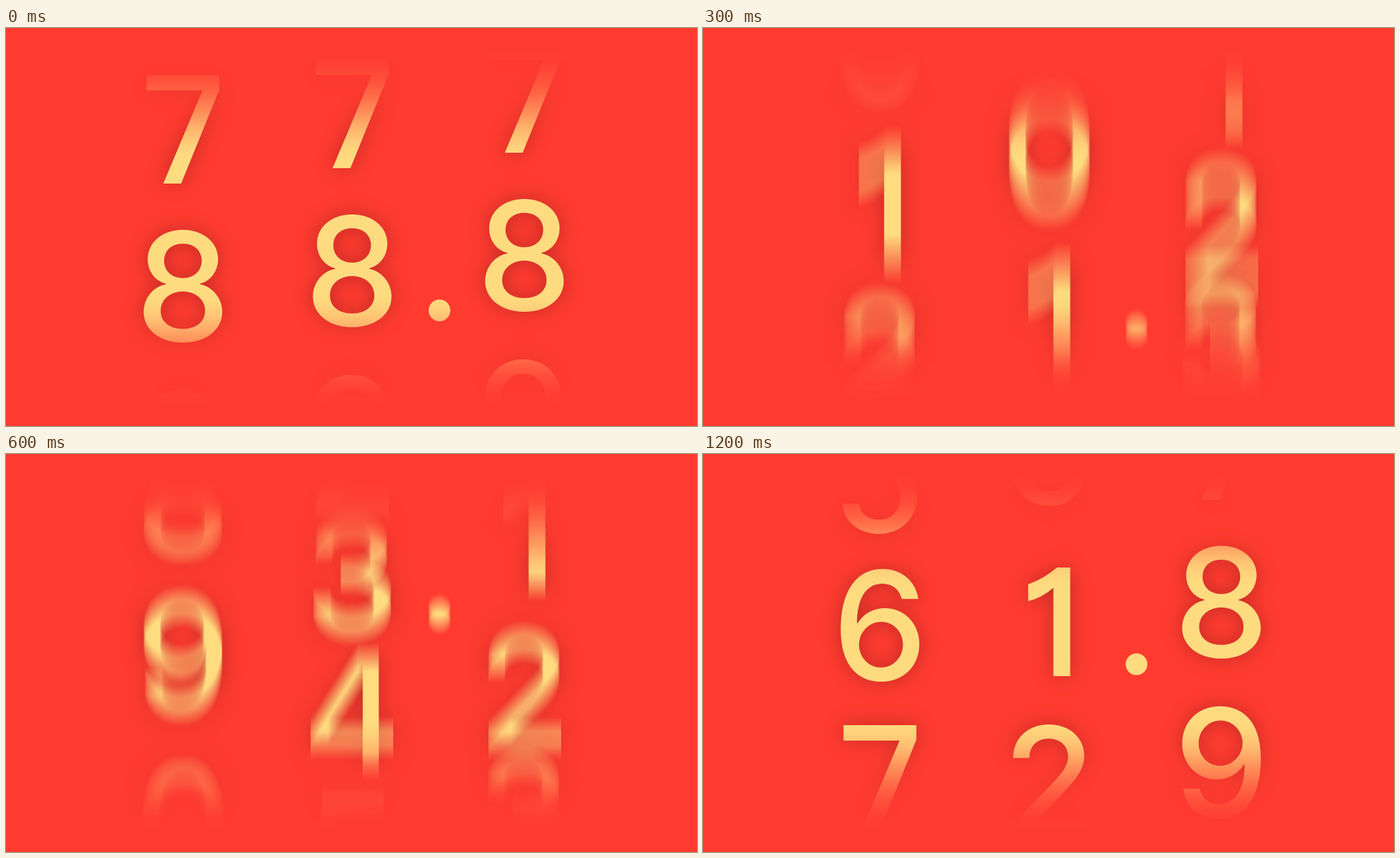
Animation, 987 px wide and 568 px high, one loop 1300 ms. Source, as an HTML page with a canvas:

```html
<!DOCTYPE html>
<html lang="en">
<head>
<meta charset="utf-8">
<title>Rolling digits</title>
<style>
  html, body { margin: 0; width: 100%; height: 100%; overflow: hidden; background: #ff3b30; }
  canvas { display: block; }
</style>
</head>
<body>
<canvas id="stage" width="987" height="568"></canvas>
<script>
const W = 987, H = 568, LOOP = 1300, STEP = 100;
const RED = '#ff3b30', GOLD = '#ffdb80';
const stage = document.getElementById('stage').getContext('2d');

function layer() {
  const c = document.createElement('canvas');
  c.width = W;
  c.height = H;
  return c.getContext('2d');
}

// Distance from each digit's baseline to the next; the 9 leads back to the 0
const gaps = [245, 228, 178, 195, 205, 211, 219, 225, 229, 242];
const turn = gaps.reduce((sum, gap) => sum + gap);

// The straight digits have their own outlines, centred on the baseline
const outlines = {
  1: new Path2D('M11-155H30V0H6V-126Q-10-112-30-107V-131Q-6-140 11-155Z'),
  7: new Path2D('M-52-155H52V-134L-2.5 0H-28L28-133H-52Z')
};

// Each reel runs downwards, gains speed and settles; y is the baseline of its 0
const times = [0, 100, 300, 500, 800, 1000, 1200];
const columns = [
  { x: 252.7, y: [918, 1248, 2261, 4456, 5533, 5600, 5592] },
  { x: 494.5, y: [896, 1190, 2429, 3621, 4360, 4426, 4426] },
  { x: 740.5, y: [874, 1050, 2069, 3723, 5026, 5106, 5115] }
];
const dot = { x: 619.2, r: 15.5, y: [403, 487, 431, 270, 183, 256.5, 300] };

const blurAt = t => t < 800 ? 82 * Math.sin(Math.PI * t / 800) ** 2 : 0;

// Smooth curve through the keys that never swings past them
function follow(v, t) {
  const rate = i => (v[i + 1] - v[i]) / (times[i + 1] - times[i]);
  const slope = i => {
    const a = rate(i - 1), b = rate(i);
    return a * b > 0 ? 2 * a * b / (a + b) : 0;
  };
  let i = 0;
  while (i < times.length - 2 && t >= times[i + 1]) i++;
  const h = times[i + 1] - times[i], u = (t - times[i]) / h, w = 1 - u;
  return v[i] * w * w * (1 + 2 * u) + v[i + 1] * u * u * (3 - 2 * u)
    + h * u * w * (slope(i) * w - slope(i + 1) * u);
}

// Even vertical smear: repeatedly average two copies, halving the distance
function smear(src, size) {
  let a = src, b = layer();
  a.shadowColor = 'transparent';
  for (let d = size / 4; d > 0.25; d /= 2) {
    b.globalAlpha = 0.5;
    b.globalCompositeOperation = 'copy';
    b.drawImage(a.canvas, 0, -d);
    b.globalCompositeOperation = 'lighter';
    b.drawImage(a.canvas, 0, d);
    [a, b] = [b, a];
  }
  a.globalAlpha = 1;
  a.globalCompositeOperation = 'source-over';
  return a;
}

function drawDigit(g, digit, x, y) {
  g.save();
  g.translate(x, y);
  if (outlines[digit]) {
    g.fill(outlines[digit]);
  } else {
    const m = g.measureText(digit);
    g.fillText(digit, (m.actualBoundingBoxLeft - m.actualBoundingBoxRight) / 2, 0);
  }
  g.restore();
}

function drawReels(t) {
  const g = layer(), margin = 60;
  g.font = '500 216px Inter, "Liberation Sans", sans-serif';
  g.fillStyle = GOLD;
  g.shadowColor = 'rgba(0,0,0,.26)';
  g.shadowBlur = 28;
  for (const { x, y } of columns) {
    let base = follow(y, t);
    gaps.forEach((gap, digit) => {
      const onReel = (base + margin) % turn - margin;
      if (onReel < H + 240) drawDigit(g, digit, x, onReel);
      base += gap;
    });
  }
  return smear(g, blurAt(t));
}

function drawDot(t) {
  const g = layer();
  g.fillStyle = GOLD;
  g.beginPath();
  g.arc(dot.x, follow(dot.y, t), dot.r, 0, 7);
  g.fill();
  return smear(g, Math.min(blurAt(t), 29));
}

// Fade towards the top and bottom edges
const fade = stage.createLinearGradient(0, 0, 0, H);
for (let u = 0; u <= 1; u += 0.0625) {
  const y = (15 + 175 * u) / H, alpha = (u * u * (3 - 2 * u)) ** 1.5;
  fade.addColorStop(y, `rgba(0,0,0,${alpha})`);
  fade.addColorStop(1 - y, `rgba(0,0,0,${alpha})`);
}

function render(t) {
  const g = drawReels(t);
  g.drawImage(drawDot(t).canvas, 0, 0);
  g.globalCompositeOperation = 'destination-in';
  g.fillStyle = fade;
  g.fillRect(0, 0, W, H);
  stage.fillStyle = RED;
  stage.fillRect(0, 0, W, H);
  stage.drawImage(g.canvas, 0, 0);
}

let shown = -1;
function tick() {
  const t = Math.floor(performance.now() % LOOP / STEP) * STEP;
  if (t !== shown) render(shown = t);
  requestAnimationFrame(tick);
}
tick();
</script>
</body>
</html>
```
